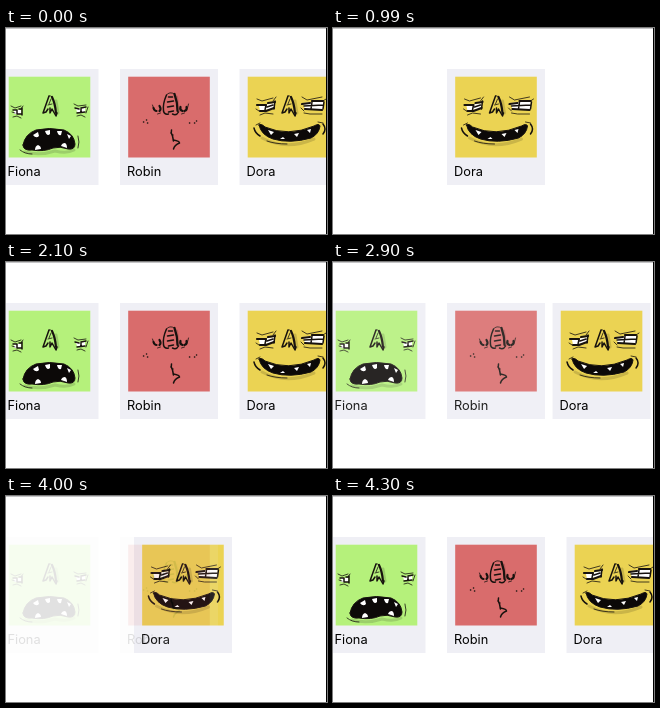
Animation, 321 px wide and 206 px high, one loop 4400 ms. Source, as an HTML page:

```html
<!DOCTYPE html>
<html lang="en">
<head>
<meta charset="utf-8">
<title>Filtered cards</title>
<style>
  html, body { margin: 0; width: 100%; height: 100%; overflow: hidden; background: #fff; }
  svg { display: block; width: 100%; height: 100%; }
  text { font: 12.8px Inter, sans-serif; fill: #000; }
  .panel { fill: #efeff5; }
  .face path { fill: none; stroke: #17120e; stroke-width: 1.5; stroke-linecap: round; stroke-linejoin: round; }
  .face .thin { stroke-width: .8; }
  .face .bold { stroke-width: 2.2; }
  .face .ink { fill: #0c0908; stroke-width: 1; }
  .face .white { fill: #fff; stroke: none; }
  .face .shade { stroke: #000; stroke-opacity: .14; stroke-width: 3; }
</style>
</head>
<body>
<svg viewBox="0 0 321 206">
  <defs>
    <g id="nose" class="face">
      <path class="shade" d="M47 24 L49 36"/>
      <path d="M40 19 L34 36 L37 35 L39 32 M41 31 L41 36 L43 32 L47 39 L48 36"/>
      <path class="bold" d="M43 20 Q46 26 47 36"/>
      <path class="thin" d="M40 19 Q42 18 43 20 M39 28 L43 27 M42 22 L40 27"/>
    </g>
  </defs>

  <g id="moving" class="card">
    <rect class="panel" y="41" width="98" height="116"/>
    <g class="face" transform="translate(8.5 49)">
      <rect x="-.3" y="-.3" width="81.6" height="80.8" fill="#ebd353"/>
      <path class="white" d="M11 29 L26 26 L26 31 L12 34 Z M55 26 L75 24 L75 33 L57 32 Z"/>
      <path class="bold" d="M9 28 L18 28 M20 26 L27 25 M12 34 L18 34 L26 31"/>
      <path d="M18 28 L17 33 M19 30 L25 28 M27 24 L26 32"/>
      <path class="thin" d="M9 22 L14 24 L25 21 M28 20 L25 24 M12 38 L17 36 L25 37 M8 32 L11 34"/>
      <path class="bold" d="M54 27 L62 26 M64 24 L75 24 M57 32 L74 33"/>
      <path d="M56 29 L75 28 M64 25 L63 32 M76 25 L75 32"/>
      <path class="thin" d="M54 20 L59 23 L74 20 M56 36 L62 37 L74 37 M53 31 L56 34 M78 22 L75 24"/>
      <use href="#nose"/>
      <path class="shade" d="M14 61 Q38 74 66 62"/>
      <path class="ink" d="M11 48 Q13 46 17 50 Q40 60 66 49 Q71 46 72 49 Q71 57 63 61 Q42 67 25 62 Q13 58 11 48 Z"/>
      <path class="white" d="M20 53 L26 55 L23 58 Z M46 57 L51 56 L49 60 Z M59 53 L63 52 L62 56 Z M32 62 L35 60 L37 62 Z"/>
      <path d="M6 51 Q7 56 12 59 M75 47 Q79 52 75 57"/>
      <path class="thin" d="M19 64 Q27 67 39 67 M8 48 L12 46 M70 45 L75 46"/>
    </g>
    <text x="7" y="148">Dora</text>
  </g>

  <g class="card fading" transform="translate(-5.5)">
    <rect class="panel" y="41" width="98" height="116"/>
    <g class="face" transform="translate(8.5 49)">
      <rect x="-.3" y="-.3" width="81.6" height="80.8" fill="#b5f17b"/>
      <path class="white" d="M5 33 L12 33 L12 37 L5 37 Z M67 32 L76 31 L76 35 L68 35 Z"/>
      <path d="M4 33 L8 33 M10 32 L13 32 M8 33 L8 37 L12 37 M13 31 L13 38"/>
      <path class="thin" d="M2 29 L6 31 L12 29 M4 40 L8 39 L12 41 M3 35 L6 36 M14 29 L12 32"/>
      <path d="M66 31 L70 32 M72 31 L77 30 M68 36 L76 35 M72 32 L72 35"/>
      <path class="thin" d="M65 27 L69 29 L77 28 M68 39 L72 38 L76 40 M79 30 L77 36"/>
      <use href="#nose"/>
      <path class="shade" d="M16 75 Q31 79 46 74 Q58 77 65 73"/>
      <path class="ink" d="M14 68 Q16 57 27 53 Q40 50 55 53 Q65 57 66 67 Q66 73 59 72 Q51 69 44 71 Q35 75 23 73 Q14 74 14 68 Z"/>
      <path class="white" d="M24 58 L29 55 L30 59 Q27 62 24 58 Z M36 54 L41 53 L41 57 Q38 60 36 54 Z M48 54 L53 54 L52 58 Q49 59 48 54 Z M58 57 L62 59 L60 62 Z M26 73 Q26 69 29 68 Q32 69 32 72 Z M52 69 Q53 66 56 66 Q58 67 58 71 Z"/>
      <path class="thin" d="M11 73 Q16 77 23 77 M69 59 Q71 65 69 71"/>
    </g>
    <text x="7" y="148">Fiona</text>
  </g>

  <g class="card fading" transform="translate(114)">
    <rect class="panel" y="41" width="98" height="116"/>
    <g class="face" transform="translate(8.5 49)">
      <rect x="-.3" y="-.3" width="81.6" height="80.8" fill="#d96c6c"/>
      <path class="shade" d="M48 20 L50 34"/>
      <path d="M38 18 Q34 27 35 34 Q36 38 40 37 M44 37 Q48 39 50 35"/>
      <path class="bold" d="M46 17 Q49 25 49 34"/>
      <path class="thin" d="M38 18 Q41 14 46 17"/>
      <path d="M40 20 L44 20 M39 25 L45 24 M39 30 L45 29 M40 35 L45 34"/>
      <path class="bold" d="M25 31 Q26 34 28 34 M31 29 Q33 32 31 34 M52 30 Q51 33 54 34 M58 30 Q59 33 56 34"/>
      <path class="thin" d="M24 28 L25 31 M29 37 L32 36 M53 37 L56 36 M60 27 L59 31"/>
      <path d="M15 45 h.2 M19 46 h.2 M18 43 h.1 M61 46 h.2 M66 46 h.2 M68 44 h.1"/>
      <path d="M43 53 Q42 56 44 59 L45 64"/>
      <path class="thin" d="M42 56 L45 58"/>
      <path d="M45 63 Q51 64 51 66 Q46 68 45 72"/>
    </g>
    <text x="7" y="148">Robin</text>
  </g>

  <rect width="321" height="1" fill="#c4c4c6"/>
  <rect x="320" width="1" height="206" fill="#000"/>
</svg>
<script>
  const LOOP = 4400, CENTER = 114, SHIFT = 119.5;
  // The list is filtered and restored in turn; each change plays in four steps.
  const changes = [
    { start: 700, span: 290, to: 0 },
    { start: 1800, span: 300, to: 1 },
    { start: 2900, span: 300, to: 0 },
    { start: 4000, span: 300, to: 1 },
  ];
  const moving = document.getElementById("moving");
  const fading = document.querySelectorAll(".fading");

  const ease = x => x * x * (3 - 2 * x);

  function listShown(time) {
    const change = changes.findLast(c => time >= c.start);
    if (!change) return 1;
    const step = Math.floor((time - change.start) / change.span * 3 + 1e-6);
    const progress = ease(Math.min(1, 0.213 + step / 3));
    return change.to ? progress : 1 - progress;
  }

  function draw(now) {
    const shown = listShown(now % LOOP);
    moving.setAttribute("transform", `translate(${CENTER + SHIFT * shown})`);
    fading.forEach(card => card.setAttribute("opacity", shown));
    requestAnimationFrame(draw);
  }
  draw(performance.now());
</script>
</body>
</html>
```
